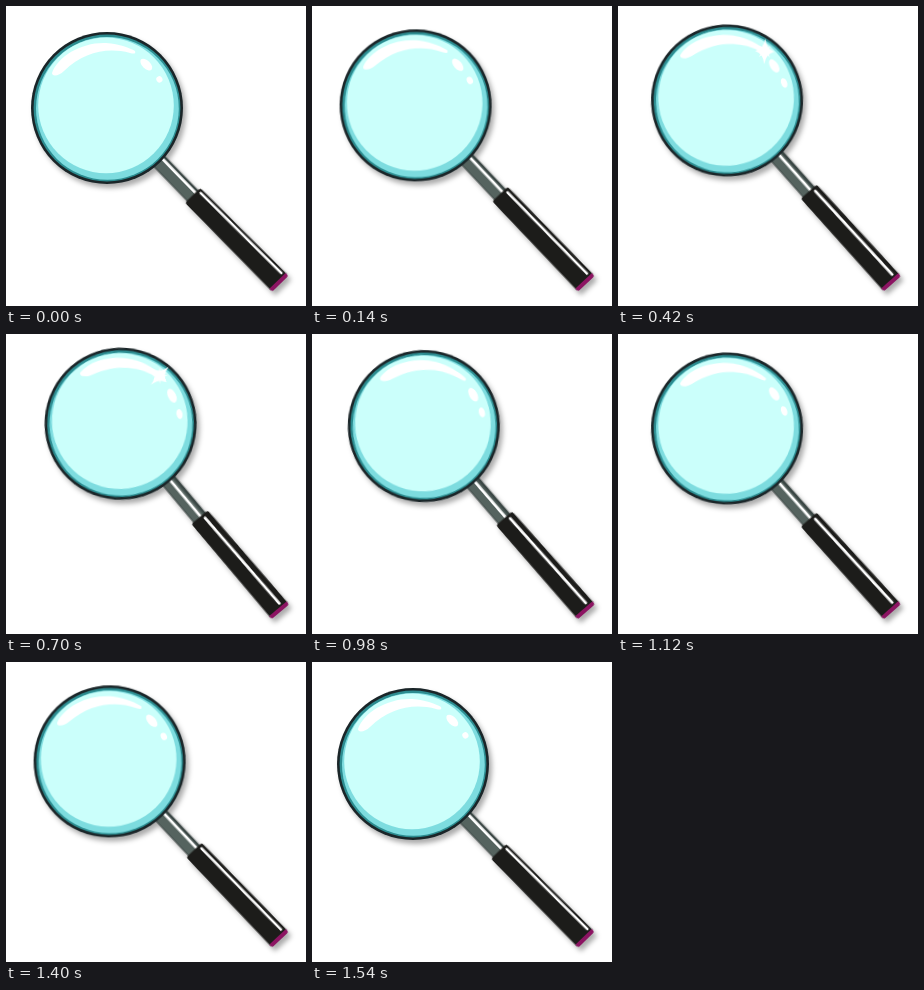
An HTML page for the animation above (1.61 s loop, 300 px wide and 300 px high).

```html
<!DOCTYPE html>
<html lang="en">
<head>
<meta charset="utf-8">
<title>Magnifying glass</title>
<style>
  html, body { margin: 0; width: 100%; height: 100%; overflow: hidden; background: #fff; }
  svg { display: block; width: 100vw; height: 100vh; }
  #shadow { filter: drop-shadow(3px 4px 2.5px rgba(0, 0, 0, .33)); }
</style>
</head>
<body>
<svg viewBox="0 0 300 300">
  <g id="shadow">
    <g id="glass">
      <g transform="translate(273 279) rotate(45.8)">
        <path d="M-176-8.3H-120V7.5H-176Z" fill="#2a3432"/>
        <path d="M-176-7.5H-120V6.8H-176Z" fill="#55635f"/>
        <path d="M-176-7.5H-120V-5.5H-176Z" fill="#3a4644"/>
        <path id="neckShine" d="M-174 0H-122" stroke="#fff" stroke-width="2.6"/>
        <path d="M-122-11.2L-3-13.3Q-1-13.2-1-11V7.5Q-1 9.5-3 9.5L-122 10Q-124.5 10-124.5 8V-9Q-124.5-11.2-122-11.2Z" fill="#1c1c1a"/>
        <path d="M-4-13.3H-2Q0-13.2 0-11V7.5Q0 9.5-2 9.5H-4Z" fill="#8c1462"/>
        <path id="gripShine" d="M-120.5 1L-7-1" stroke="#fff" stroke-width="2.6" stroke-linecap="round"/>
      </g>
      <circle cx="101" cy="102" r="76" fill="#1a2528"/>
      <circle cx="101" cy="102" r="73.4" fill="#2c8c90"/>
      <circle cx="101.4" cy="102.4" r="71.4" fill="#7ddcdf"/>
      <circle cx="100" cy="99.4" r="67.8" fill="#cbfffb"/>
      <g id="shine" fill="#fff">
        <path d="M46 67C52 50 76 36 100 37C114 38 124 42 129 45C130 48 128 48 124 47C101 41 78 46 58 65C53 70 46 71 46 67Z"/>
        <ellipse rx="7.4" ry="4" transform="translate(140.3 58.6) rotate(45)"/>
        <ellipse id="dot" ry="3" transform="translate(153.4 73.4) rotate(58)"/>
      </g>
      <path id="star" fill="#fff" d="M0-1Q.1-.2.75 0Q.1.2 0 1Q-.1.2-.75 0Q-.1-.2 0-1ZM.45-.45L.16 0L.45.45L0 .16L-.45.45L-.16 0L-.45-.45L0-.16Z"/>
    </g>
  </g>
</svg>
<script>
const STEP = 70, STEPS = 23, PEAK = 11;
const $ = id => document.getElementById(id);
const place = (id, value) => $(id).setAttribute('transform', value);

function draw(step) {
  const lift = PEAK - Math.abs(PEAK - step);
  place('glass', `rotate(${lift * 0.425} 273 279)`);
  place('shine', `rotate(${lift * 1.5} 101 102)`);
  place('gripShine', `translate(0 ${lift * 0.36 - 9})`);
  place('neckShine', `translate(0 ${lift * 0.25 - 4.4})`);
  $('dot').setAttribute('rx', 3.2 + Math.min(lift, 6) * 0.3);

  // The glint turns while it swells and fades.
  const size = step > 4 && step < 12 ? 18 * Math.sin(Math.PI * (step - 4) / 8) : 0;
  place('star', `translate(136.5 51.2) rotate(${(step - 6) * 10}) scale(${size})`);
}

const start = performance.now();
function tick() {
  draw(Math.floor((performance.now() - start) / STEP) % STEPS);
  requestAnimationFrame(tick);
}
tick();
</script>
</body>
</html>
```
